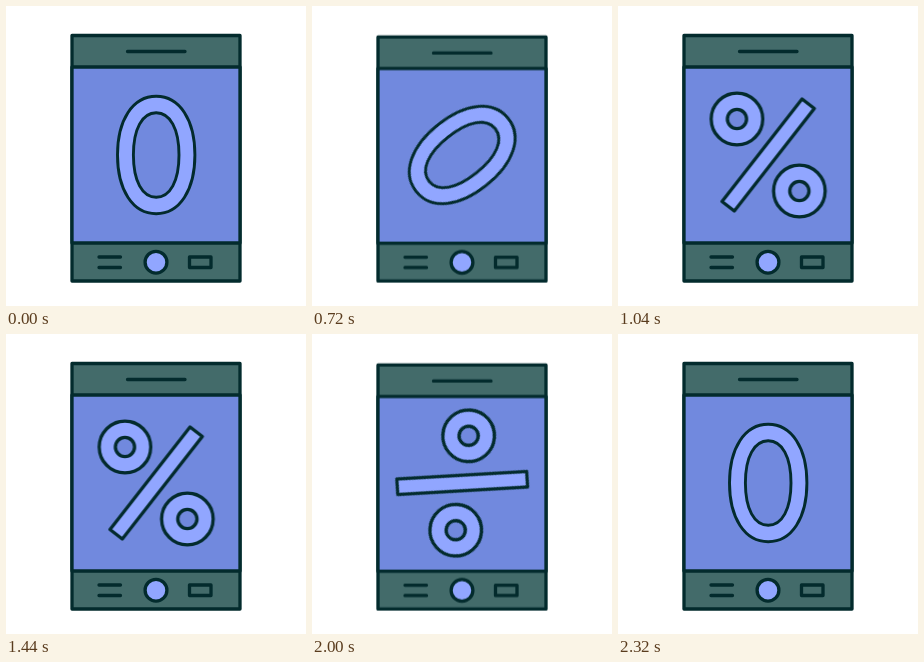
Recreate the animation shown at these times as an HTML page. Size 300 px wide and 300 px high, loop 2480 ms.

```html
<!DOCTYPE html>
<html lang="en">
<head>
<meta charset="utf-8">
<title>Zero percent phone</title>
<style>
  :root {
    --ink: #032b2d;
    --case: #436b6a;
    --screen: #7189de;
    --light: #91a6ff;
    --loop: 2480ms;
  }
  html, body {
    margin: 0;
    width: 100%;
    height: 100%;
    overflow: hidden;
    background: #fff;
  }
  svg {
    display: block;
    width: 100%;
    height: 100%;
    stroke: var(--ink);
    stroke-width: 3.3;
    stroke-linecap: round;
    stroke-linejoin: round;
  }
  .case { fill: var(--case); }
  .screen { fill: var(--screen); }
  .light { fill: var(--light); }
  .line { fill: none; }

  .phone {
    transform-origin: 150px 275px;
    animation: squash var(--loop) ease-in-out infinite;
  }
  .spin {
    transform-origin: 150.2px 149px;
    animation: spin var(--loop) linear infinite;
  }
  .zero { animation: zero var(--loop) step-end infinite; }
  .percent { animation: percent var(--loop) step-end infinite; }

  /* Both symbols look the same after half a turn. */
  @keyframes spin {
    0% { transform: rotate(0deg); }
    20.968% { transform: rotate(0deg); animation-timing-function: cubic-bezier(.5, 0, .5, 1); }
    41.935% { transform: rotate(180deg); }
    75.806% { transform: rotate(180deg); animation-timing-function: cubic-bezier(.28, 0, .48, 1); }
    93.548%, 100% { transform: rotate(360deg); }
  }
  @keyframes squash {
    0%, 24.194%, 35.484%, 75.806%, 87.097%, 100% { transform: scaleY(1); }
    29.032%, 80.645% { transform: scaleY(.9935); }
    32.258%, 83.871% { transform: scaleY(1.012); }
  }
  @keyframes zero {
    0%, 83.871%, 100% { visibility: visible; }
    32.258% { visibility: hidden; }
  }
  @keyframes percent {
    0%, 83.871%, 100% { visibility: hidden; }
    32.258% { visibility: visible; }
  }
</style>
</head>
<body>
<svg viewBox="0 0 300 300">
  <g class="phone">
    <rect class="case" x="66" y="29.5" width="168" height="245.5"/>
    <rect class="screen" x="66" y="61" width="168" height="176"/>
    <path class="line" d="M121.5 45.5H179M93 251H114.5M93 261.5H114.5"/>
    <circle class="light" cx="150" cy="256.2" r="10.9"/>
    <rect class="line" x="183.5" y="251" width="21.5" height="10.5"/>
  </g>
  <g class="spin">
    <g class="zero" transform="translate(150.2 149)" stroke-width="2.9">
      <path class="light" d="M0-58.7C23.5-58.7 38.7-35 38.7 0S23.5 58.7 0 58.7S-38.7 35-38.7 0S-23.5-58.7 0-58.7Z"/>
      <path class="screen" d="M0-42.2C14-42.2 22.8-26 22.8 0S14 42.2 0 42.2S-22.8 26-22.8 0S-14-42.2 0-42.2Z"/>
    </g>
    <g class="percent" transform="translate(150.2 149)">
      <rect class="light" x="-7.8" y="-65" width="15.6" height="130" transform="rotate(38)"/>
      <circle class="light" cx="-31.2" cy="-36" r="25.8"/>
      <circle class="screen" cx="-31.2" cy="-36" r="9.6"/>
      <circle class="light" cx="31.2" cy="36" r="25.8"/>
      <circle class="screen" cx="31.2" cy="36" r="9.6"/>
    </g>
  </g>
</svg>
</body>
</html>
```
